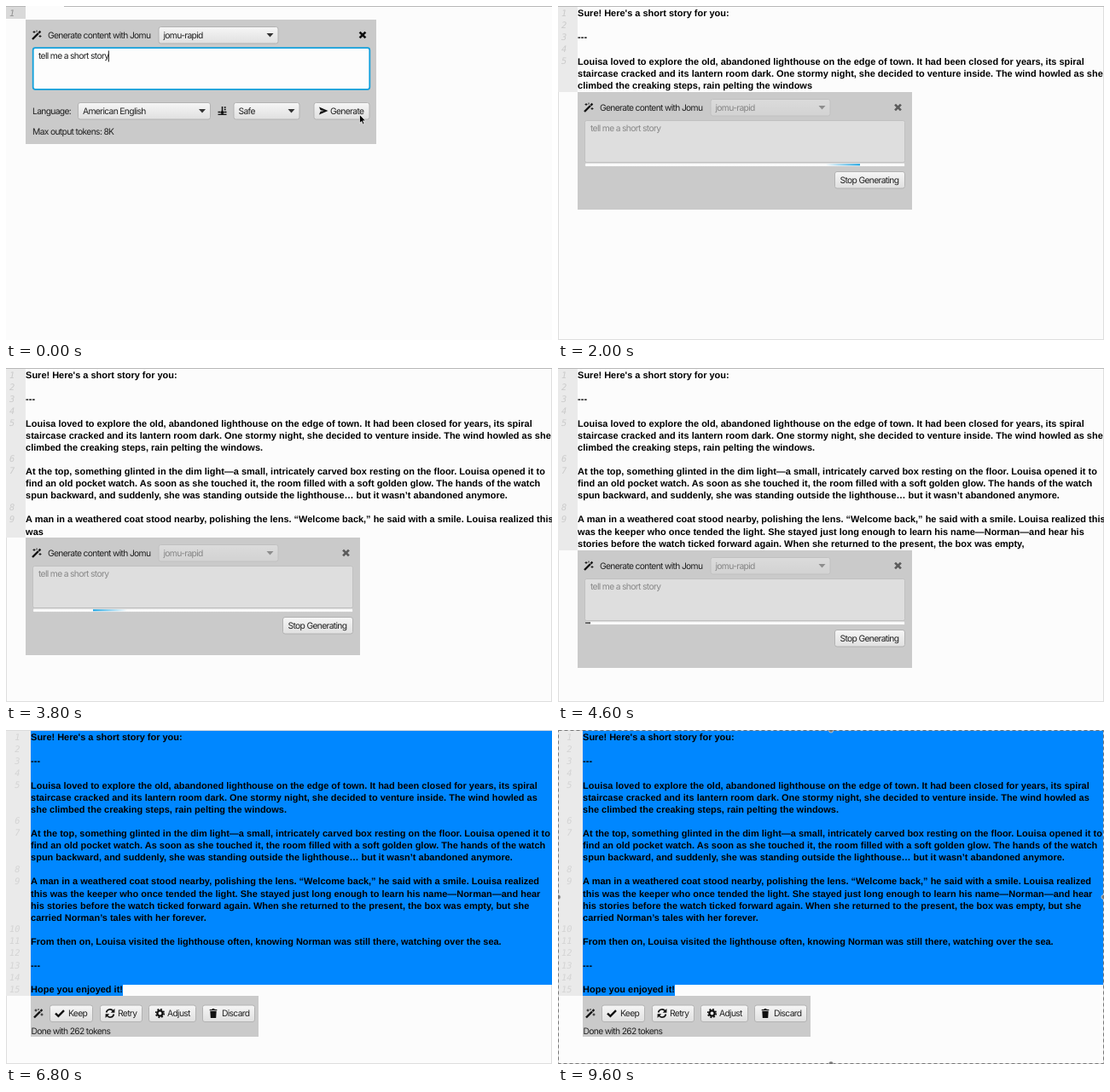
An HTML page that plays this animation: 640 by 392 pixels, repeating every 9.8 s.

```html
<!DOCTYPE html>
<html lang="en">
<head>
<meta charset="utf-8">
<title>Generate content</title>
<style>
html, body { margin: 0; width: 100%; height: 100%; overflow: hidden; background: #fcfcfc; }
svg { display: block; width: 640px; height: 392px; }
text { white-space: pre; text-rendering: geometricPrecision; }
.doc { font: bold 10.97px "Liberation Sans", Arial, sans-serif; }
.ui { font: 10.3px Inter, sans-serif; letter-spacing: -.67px; }
.num { font: italic 10.4px "DejaVu Sans Mono", monospace; }
</style>
</head>
<body>
<svg id="stage" viewBox="0 0 640 392" xmlns="http://www.w3.org/2000/svg">
  <defs>
    <linearGradient id="btn" x2="0" y2="1">
      <stop stop-color="#f6f6f6"/><stop offset="1" stop-color="#e0e0e0"/>
    </linearGradient>
    <linearGradient id="track" x2="0" y2="1">
      <stop stop-color="#e4e4e4"/><stop offset=".5" stop-color="#fff"/><stop offset="1" stop-color="#f2f2f2"/>
    </linearGradient>
    <linearGradient id="glow">
      <stop stop-color="#0f9fe0" stop-opacity="0"/><stop offset="1" stop-color="#0f9fe0"/>
    </linearGradient>
    <linearGradient id="shade">
      <stop stop-color="#444" stop-opacity="0"/><stop offset="1" stop-color="#444"/>
    </linearGradient>
  </defs>
  <g id="view"></g>
</svg>
<script>
const LOOP = 9800, STEP = 200, PITCH = 14.1;
const START = 200, DONE = 5600, FRAMED = 7000;
const view = document.getElementById('view');

// "<" breaks the row only beside the narrow gutter, ">" only beside the wide one, "|" always.
const story = [
  "Sure! Here's a short story for you:", '', '---', '',
  'Louisa loved to explore the old, abandoned lighthouse on the edge of town. It had been closed for years, its spiral|' +
  'staircase cracked and its lantern room dark. One stormy night, she decided to venture inside. The wind howled as>she<' +
  'climbed the creaking steps, rain pelting the windows.', '',
  'At the top, something glinted in the dim light—a small, intricately carved box resting on the floor. Louisa opened it to|' +
  'find an old pocket watch. As soon as she touched it, the room filled with a soft golden glow. The hands of the watch|' +
  'spun backward, and suddenly, she was standing outside the lighthouse… but it wasn’t abandoned anymore.', '',
  'A man in a weathered coat stood nearby, polishing the lens. “Welcome back,” he said with a smile. Louisa realized>this<' +
  'was the keeper who once tended the light. She stayed just long enough to learn his name—Norman—and hear>his<' +
  'stories before the watch ticked forward again. When she returned to the present, the box was empty, but she>' +
  'carried Norman’s tales with her forever.', '',
  'From then on, Louisa visited the lighthouse often, knowing Norman was still there, watching over the sea.', '',
  '---', '', 'Hope you enjoyed it!'
].join('\n');

const after = s => story.indexOf(s) + s.length;
const typing = [
  [770, 0], [2000, after('the windows')], [3200, after('but it')],
  [4600, after('was empty,')], [5200, after('the sea.\n\n')], [5400, story.length]
];
// Distance covered by the progress glow, folded into a back-and-forth sweep.
const sweep = [[200, -130], [2000, 282], [3200, 591], [4600, 794], [5200, 904], [5600, 986]];

function along(keys, t) {
  if (t <= keys[0][0]) return keys[0][1];
  for (let i = 1; i < keys.length; i++) {
    const [a, u] = keys[i - 1], [b, v] = keys[i];
    if (t <= b) return u + (v - u) * (t - a) / (b - a);
  }
  return keys[keys.length - 1][1];
}

function typed(t) {
  let n = Math.round(along(typing, t));
  const word = i => /\w/.test(story[i] || ' ');
  while (n > 0 && word(n) && word(n - 1)) n--;
  return story.slice(0, n);
}

const esc = s => s.replace(/&/g, '&amp;').replace(/</g, '&lt;');
const rect = (x, y, w, h, fill, more = '') =>
  `<rect x="${x}" y="${y}" width="${w}" height="${h}" fill="${fill}" ${more}/>`;
const path = (d, more = 'fill="#111"') => `<path d="${d}" ${more}/>`;
const text = (cls, x, y, s, fill = '#111') =>
  `<text class="${cls}" x="${x}" y="${y}" fill="${fill}">${esc(s)}</text>`;
const label = (x, mid, s, fill = '#222') => text('ui', x, mid + 3.75, s, fill);
const group = (x, y, body, opacity = 1) =>
  `<g transform="translate(${x} ${y})" opacity="${opacity}">${body}</g>`;
const stroke = (w, color = '#111') => `fill="none" stroke="${color}" stroke-width="${w}"`;

const button = (x, y, w) =>
  rect(x + .5, y + .5, w - 1, 19.5, 'url(#btn)', 'rx="2.5" stroke="#b2b2b2"');
const combo = (x, y, w, s) => button(x, y, w) + label(x + 6, y + 10, s) +
  path(`M${x + w - 14} ${y + 8}h8l-4 4.5z`, 'fill="#333"');

// Icons are drawn around their own centre.
const icon = {
  wand: path('M-5 5L2 -2', stroke(2.4)) + path('M2.4 -2.4L4.4 -4.4', stroke(2.2)) +
    path('M-3 -5v3M-4.5 -3.5h3M4 0v3M2.5 1.5h3M0 -5.5v2', stroke(.9)),
  close: path('M-3.4 -3.4L3.4 3.4M3.4 -3.4L-3.4 3.4', stroke(2.7)),
  heat: path('M0 -5V3M2.2 -4h2M2.2 -1.5h2', stroke(1.5)) +
    path('M-5 1.5h3M2 1.5h3M-5 4.3H5', stroke(1.3)) + '<circle cy="2" r="2" fill="#111"/>',
  send: path('M-5 -4.6L5.5 0L-5 4.6L-3.4 .7L1 0L-3.4 -.7z'),
  check: path('M-5 .2L-1.6 3.4L5 -3.4', stroke(2.4)),
  retry: path('M-4.4 -1A4.4 4.4 0 0 1 3.6 -2.6M4.4 1A4.4 4.4 0 0 1 -3.6 2.6', stroke(1.7)) +
    path('M5.4 -5.4V-.8H.8zM-5.4 5.4V.8H-.8z'),
  gear: `<circle r="3.1" ${stroke(2.3)}/><circle r="4.8" ${stroke(1.7)} stroke-dasharray="1.9 1.87"/>`,
  trash: path('M-4.3 -4.6h2.6l.7 -.9h2l.7 .9h2.6v1.3h-8.6z') + path('M-3.7 -2.5h7.4l-.5 8h-6.4z')
};
const put = (name, x, y, opacity) => group(x, y, icon[name], opacity);

const heading = put('wand', 13, 18) + label(26, 18, 'Generate content with Jomu');
const model = combo(155.5, 8, 141, 'jomu-rapid');
const prompt = 'tell me a short story';

const askPanel = () => rect(0, 0, 411, 146, '#cacaca') + heading + model + put('close', 395, 18) +
  rect(8.7, 33.2, 394.6, 48.6, '#fdfdfd', 'rx="2.5" stroke="#12a0dc" stroke-width="1.8"') +
  label(15, 42.5, prompt) + rect(96.8, 36.5, 1, 13, '#111') +
  label(8, 107, 'Language:') + combo(61, 97, 156, 'American English') +
  put('heat', 230.5, 107) + combo(243.5, 97, 78, 'Safe') +
  button(337.5, 97, 66) + put('send', 349, 107) + label(357, 107, 'Generate') +
  label(8, 131.5, 'Max output tokens: 8K');

function glow(t) {
  const span = 414, size = 40;
  const u = ((along(sweep, t) + size) % (2 * span) + 2 * span) % (2 * span);
  const back = u > span;
  const x = (back ? 2 * span - u : u) - size;
  const lo = Math.max(0, x), hi = Math.min(374, x + size);
  if (hi <= lo) return '';
  const paint = t < 4600 ? 'glow' : 'shade';
  const turn = back ? `translate(${x + size} 0) scale(-1 1)` : `translate(${x} 0)`;
  return `<svg x="9" y="84" width="374" height="3" overflow="hidden">` +
    `<g transform="${turn}">${rect(0, .3, size, 2, `url(#${paint})`)}</g></svg>`;
}

const busyPanel = t => rect(0, 0, 392, 138, '#cacaca') + heading + group(0, 0, model, .4) +
  put('close', 375.5, 18, .6) +
  rect(8.5, 33.5, 375, 49, '#dedede', 'rx="2" stroke="#c0c0c0"') + label(15, 42.5, prompt, '#888') +
  rect(8.7, 83, 374.8, 4.6, 'url(#track)', 'rx="1" stroke="#bbb" stroke-width=".5"') + glow(t) +
  button(301, 93, 83) + label(307.5, 103, 'Stop Generating');

const actions = [
  ['check', 22, 51, 34, 'Keep', 44], ['retry', 81, 50, 93, 'Retry', 102],
  ['gear', 138, 56, 151.5, 'Adjust', 160], ['trash', 201, 62, 214, 'Discard', 224]
];
const donePanel = () => rect(0, 0, 267, 48, '#cacaca') + put('wand', 9, 20.5) +
  actions.map(([name, x, w, ix, s, tx]) =>
    button(x, 10.5, w) + put(name, ix, 20.5) + label(tx, 20.5, s)).join('') +
  label(.5, 41.5, 'Done with 262 tokens');

const pointer = path('M414.5 127.5v10l2.3 -2.1l1.6 3.6l1.7 -.8l-1.6 -3.4h3z',
  'fill="#000" stroke="#fff" stroke-width=".7"');

const handle = (x, y) => `<circle cx="${x}" cy="${y}" r="2.6" fill="#777" stroke="#ddd" stroke-width=".7"/>`;
const captureFrame = () =>
  rect(.5, .5, 639, 391, 'none', 'stroke="#ddd"') +
  rect(.5, .5, 639, 391, 'none', 'stroke="#777" stroke-dasharray="4 3"') +
  handle(320, .5) + handle(639.5, 196) + handle(320, 391.5) + handle(.5, 196);

function draw(t) {
  const idle = t < START, done = t >= DONE;
  const lines = typed(t).split('\n');
  const wide = lines.length > 9;
  const edge = wide ? 29 : 23;
  const breaks = wide ? /[|>]/ : /[|<]/;
  const ink = idle ? '#929292' : done ? '#d4d4d4' : '#cbcbcb';
  let rows = 0, words = '', nums = '';
  lines.forEach((line, i) => {
    const n = String(i + 1).padStart(wide ? 2 : 1);
    nums += text('num', 4, 11.6 + rows * PITCH, n, ink);
    line.split(breaks).forEach(row => {
      words += text('doc', edge + .1, 12.2 + rows * PITCH, row.replace(/[<>]/g, ' '), '#000');
      rows++;
    });
  });
  const top = Math.round(2 + rows * PITCH);
  let out = rect(0, 0, 640, 392, '#fcfcfc');
  if (!idle) out += rect(.5, .5, 639, 391, 'none', 'stroke="#dedede"');
  out += rect(0, 0, 640, 1, done ? '#dcdcdc' : '#b8b8b8');
  if (idle) out += rect(23, 0, 45, 1, '#fcfcfc');
  out += rect(0, 1, edge, top - (idle ? 2 : 1), idle ? '#d9d9d9' : '#eaeaea') + nums;
  if (done) {
    const last = top - 13;
    out += rect(edge, 1, 640 - edge, last - 1, '#0087ff') + rect(edge, last, 108, 13, '#0087ff');
  }
  out += words + group(edge, top, idle ? askPanel() : done ? donePanel() : busyPanel(t));
  if (idle) out += pointer;
  if (t >= FRAMED) out += captureFrame();
  view.innerHTML = out;
}

const begin = performance.now();
let shown = -1;
function tick() {
  const t = (performance.now() - begin) % LOOP;
  const now = Math.floor(t / STEP) * STEP;
  if (now !== shown) draw(shown = now);
  requestAnimationFrame(tick);
}
tick();
</script>
</body>
</html>
```
